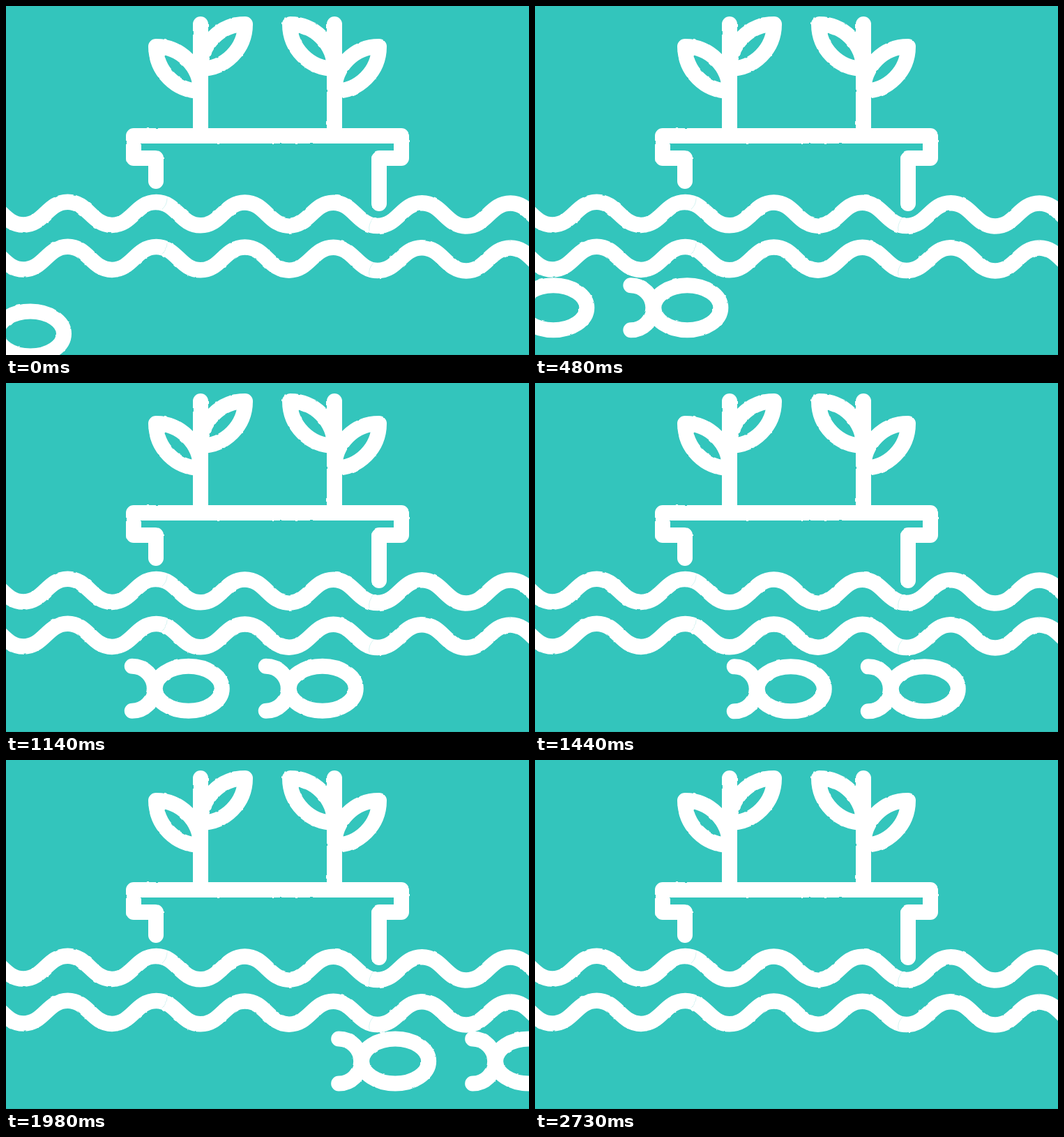
These frames come from a looping animation (750 by 500 pixels, 3600 ms). An HTML page:

```html
<!DOCTYPE html>
<html lang="en">
<head>
<meta charset="utf-8">
<title>Floating garden</title>
<style>
  html, body { margin: 0; width: 100%; height: 100%; overflow: hidden; background: #33c5bc; }
  svg { display: block; width: 100vw; height: 100vh; }
  .ink { fill: none; stroke: #fff; stroke-width: 22; stroke-linecap: round; stroke-linejoin: round; }
  .seam { fill: none; stroke: #33c5bc; stroke-opacity: .2; }
</style>
</head>
<body>
<svg viewBox="0 0 750 500">
  <defs>
    <filter id="rough" filterUnits="userSpaceOnUse" x="-110" y="-60" width="900" height="620"
            color-interpolation-filters="sRGB">
      <feTurbulence type="fractalNoise" baseFrequency=".09" numOctaves="1" seed="4"/>
      <feDisplacementMap in="SourceGraphic" scale="2.5" xChannelSelector="R" yChannelSelector="G"/>
    </filter>
    <g id="plant">
      <path d="M279 26V186"/>
      <path d="M215 58A64 64 0 0 1 279 122A64 64 0 0 1 215 58Z"/>
      <path d="M343 26A64 64 0 0 1 279 90A64 64 0 0 1 343 26Z"/>
    </g>
    <g id="wave">
      <path id="crests" stroke-width="22.5"/>
      <path class="seam" stroke-width="1" d="M231 276Q231 285 224 291M527 304Q519 312 521 322"/>
    </g>
    <g id="fish" class="ink" filter="url(#rough)">
      <ellipse rx="48" ry="32"/>
      <path d="M-81 -32A32 32 0 0 1 -81 32"/>
    </g>
    <path id="route"/>
  </defs>
  <rect width="750" height="500" fill="#33c5bc"/>
  <rect y="499" width="750" height="1" fill="#30b8b0"/>
  <g class="ink" filter="url(#rough)">
    <use href="#plant"/>
    <use href="#plant" transform="translate(750) scale(-1 1)"/>
    <path d="M215 251V218H183V186H567V218H535V283"/>
    <use href="#wave"/>
    <use href="#wave" y="64"/>
  </g>
  <g id="school">
    <use href="#fish"/>
    <use href="#fish" x="-192"/>
  </g>
</svg>
<script>
  const LOOP = 3600, STEP = 30, SWIM = 2700;
  const el = id => document.getElementById(id);
  const school = el('school'), route = el('route');

  // Smooth curve with a level tangent at every point
  function swell(points, pull) {
    return points.map(([x, y], i) => {
      if (!i) return `M${x} ${y}`;
      const [px, py] = points[i - 1], c = (x - px) * pull;
      return `C${px + c} ${py} ${x - c} ${y} ${x} ${y}`;
    }).join('');
  }

  const crests = Array.from({ length: 16 }, (_, i) =>
    [-102 + 63.5 * i, (i % 2 ? 280.5 : 313.5) + 0.19 * (i - 2)]);
  el('crests').setAttribute('d', swell(crests, 0.46));

  // Turning points of the leading fish; it swims at constant speed along them
  const dips = [461, 419, 462, 425, 462, 420].map((y, i) => [318 + 93 * i, y]);
  route.setAttribute('d', swell([[35, 469.5], [243, 431], ...dips, [854, 431], [1028, 436]], 0.37));
  const length = route.getTotalLength();

  function draw(ms) {
    const t = Math.floor(ms % LOOP / STEP) * STEP;
    const { x, y } = route.getPointAtLength(length * t / SWIM);
    school.setAttribute('transform', `translate(${x.toFixed(2)} ${y.toFixed(2)})`);
    school.setAttribute('visibility', t <= SWIM ? 'visible' : 'hidden');
  }

  const start = performance.now();
  function tick() {
    draw(performance.now() - start);
    requestAnimationFrame(tick);
  }
  tick();
</script>
</body>
</html>
```
